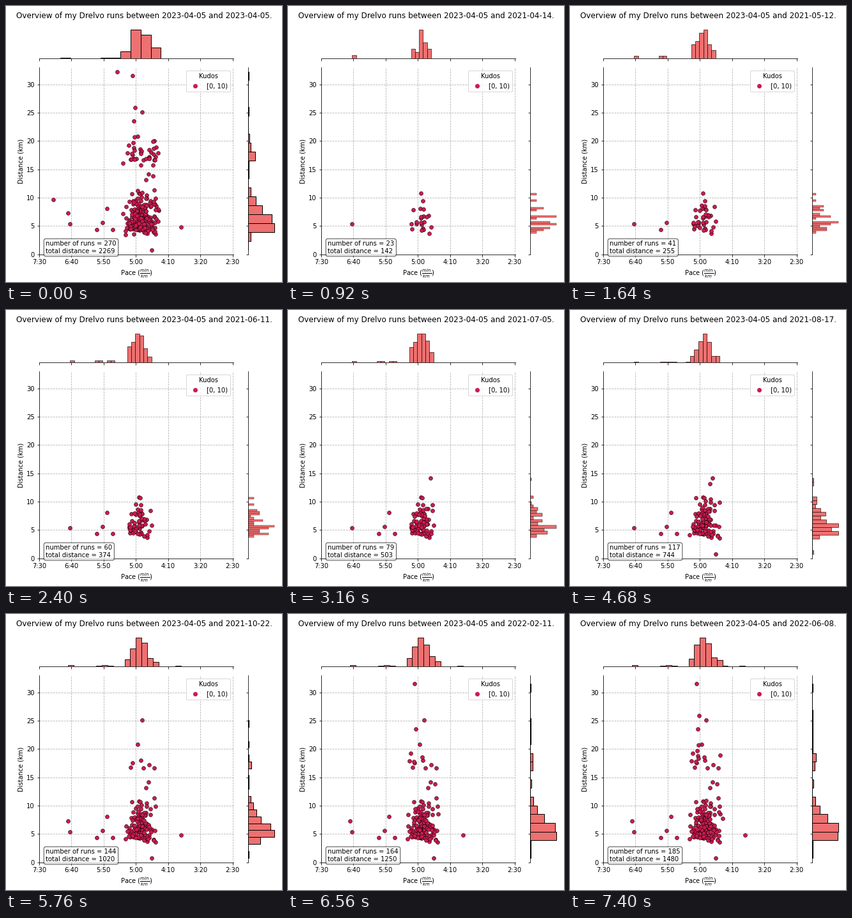
A matplotlib script that plays this animation: 432 px wide and 432 px high, repeating every 7440 ms.

```python
import matplotlib.pyplot as plt
import numpy as np
from matplotlib.animation import FuncAnimation
from matplotlib.lines import Line2D

SIZE, DPI, BINS, RUNS = 432, 72, 20, 270
DOT, BAR = "#cb1b4f", "#ee7070"
rng = np.random.default_rng(12)

# Milestones: runs so far, day, total km
MARKS = [1, 23, 60, 96, 117, 144, 185, RUNS]
DAYS = [np.datetime64(d) for d in (
    "2021-03-09", "2021-04-14", "2021-06-11", "2021-07-26", "2021-08-17",
    "2021-10-22", "2022-06-08", "2023-04-05")]
TOTALS = [0, 142, 374, 597, 744, 1020, 1480, 2269]
OFFSETS = [(d - DAYS[0]).astype(int) for d in DAYS]

# Unusual runs: number -> (pace in s/km, km)
UNUSUAL = {5: (402, 5.4), 28: (361, 4.4), 36: (352, 5.6), 44: (345, 8.1),
           52: (336, 4.4), 85: (275, 0.8), 124: (290, 25.1), 130: (405, 7.3),
           138: (230, 4.8), 160: (305, 31.6), 172: (301, 25.9),
           205: (329, 32.3), 232: (428, 9.7), 258: (542, 5)}


def make_runs():
    """Everyday runs with a widening pace range; later every fourth is long."""
    number = np.arange(RUNS)
    spread = np.clip(number / 140, 0, 1)
    fast, slow = 275 - 16 * spread, 319 + 8 * spread
    pace = fast + (slow - fast) * rng.beta(2.2, 2.5, RUNS)
    is_long = (number > 116) & (number % 4 == 1)
    km = np.where(is_long, 15.5 + rng.exponential(2.5, RUNS),
                  3 + rng.gamma(3, 1.1, RUNS))
    runs = np.column_stack([pace, km])
    everyday = np.ones(RUNS, bool)
    for i, run in UNUSUAL.items():
        runs[i], everyday[i] = run, False
    # scale the everyday distances so each milestone total is met
    starts = [0] + MARKS[1:-1]
    for a, b, goal in zip(starts, MARKS[1:], np.diff(TOTALS)):
        part, free = runs[a:b, 1], everyday[a:b]
        part[free] *= (goal - part[~free].sum()) / part[free].sum()
    return runs


runs = make_runs()
fig = plt.figure(figsize=(SIZE / DPI, SIZE / DPI), dpi=DPI, facecolor="white")


def add_axes(x0, y0, x1, y1, hide):
    ax = fig.add_axes([x0 / SIZE, 1 - y1 / SIZE, (x1 - x0) / SIZE, (y1 - y0) / SIZE])
    ax.spines[hide].set_visible(False)
    return ax


LEFT, RIGHT, TOP, BOTTOM = 51.9, 356.3, 96.3, 388.6
PX_PER_S, MAX_KM = 1.009, 33
PACE_LIM = (450, 450 - (RIGHT - LEFT) / PX_PER_S)

joint = add_axes(LEFT, TOP, RIGHT, BOTTOM, ["top", "right"])
top = add_axes(LEFT, 35, RIGHT, 82.2, ["top", "right", "left"])
side = add_axes(378.8, TOP, 422.3, BOTTOM, ["top", "right", "bottom"])

paces, kms = range(150, 451, 50), range(0, 31, 5)
joint.set(xlabel=r"Pace ($\frac{min}{km}$)", ylabel="Distance (km)", yticks=kms)
joint.set_xticks(paces, [f"{p // 60}:{p % 60:02d}" for p in paces])
joint.grid(linestyle="--")
joint.set_axisbelow(True)
top.set_xticks(paces, [""] * len(paces))
top.set_yticks([])
side.set_yticks(kms, [""] * len(kms))
side.set_xticks([])

dots = joint.scatter([], [], s=36, color=DOT, edgecolor="black", linewidth=0.5, zorder=2)
joint.legend(handles=[Line2D([], [], marker="o", ls="", color=DOT, ms=6, label="[0, 10)")],
             title="Kudos", loc="upper right")
note = joint.text(0.034, -0.001, "", transform=joint.transAxes, va="bottom",
                  bbox=dict(boxstyle="round", facecolor="white", alpha=0.7))
title = fig.suptitle("")

style = dict(facecolor=BAR, edgecolor="black", align="edge")
cols = top.bar(np.zeros(BINS), np.zeros(BINS), **style)
rows = side.barh(np.zeros(BINS), np.zeros(BINS), **style)
joint.set(xlim=PACE_LIM, ylim=(0, MAX_KM))
top.set(xlim=PACE_LIM, ylim=(0, 1.05))
side.set(xlim=(0, 1.05), ylim=(0, MAX_KM))


def set_bars(bars, values, px_per_unit, horizontal=False):
    counts, edges = np.histogram(values, BINS)
    step = edges[1] - edges[0]
    width = min(1, 0.1 * step * px_per_unit)
    for bar, size, edge in zip(bars, counts / counts.max(), edges):
        if horizontal:
            bar.set_bounds(0, edge, size, step)
        else:
            bar.set_bounds(edge, 0, step, size)
        bar.set_linewidth(width)


def update(i):
    n = i or RUNS  # the loop opens on the full set
    shown = runs[:n]
    dots.set_offsets(shown)
    set_bars(cols, shown[:, 0], PX_PER_S)
    set_bars(rows, shown[:, 1], (BOTTOM - TOP) / MAX_KM, horizontal=True)
    day = DAYS[0] + int(round(np.interp(n, MARKS, OFFSETS)))
    title.set_text(f"Overview of my Drelvo runs between {DAYS[-1]} and {day}.")
    note.set_text(f"number of runs = {n}\ntotal distance = {shown[:, 1].sum():.0f}")
    return dots, note, title, *cols, *rows


anim = FuncAnimation(fig, update, frames=186, interval=40, repeat=True,
                     repeat_delay=0, blit=False)
plt.show()
```
